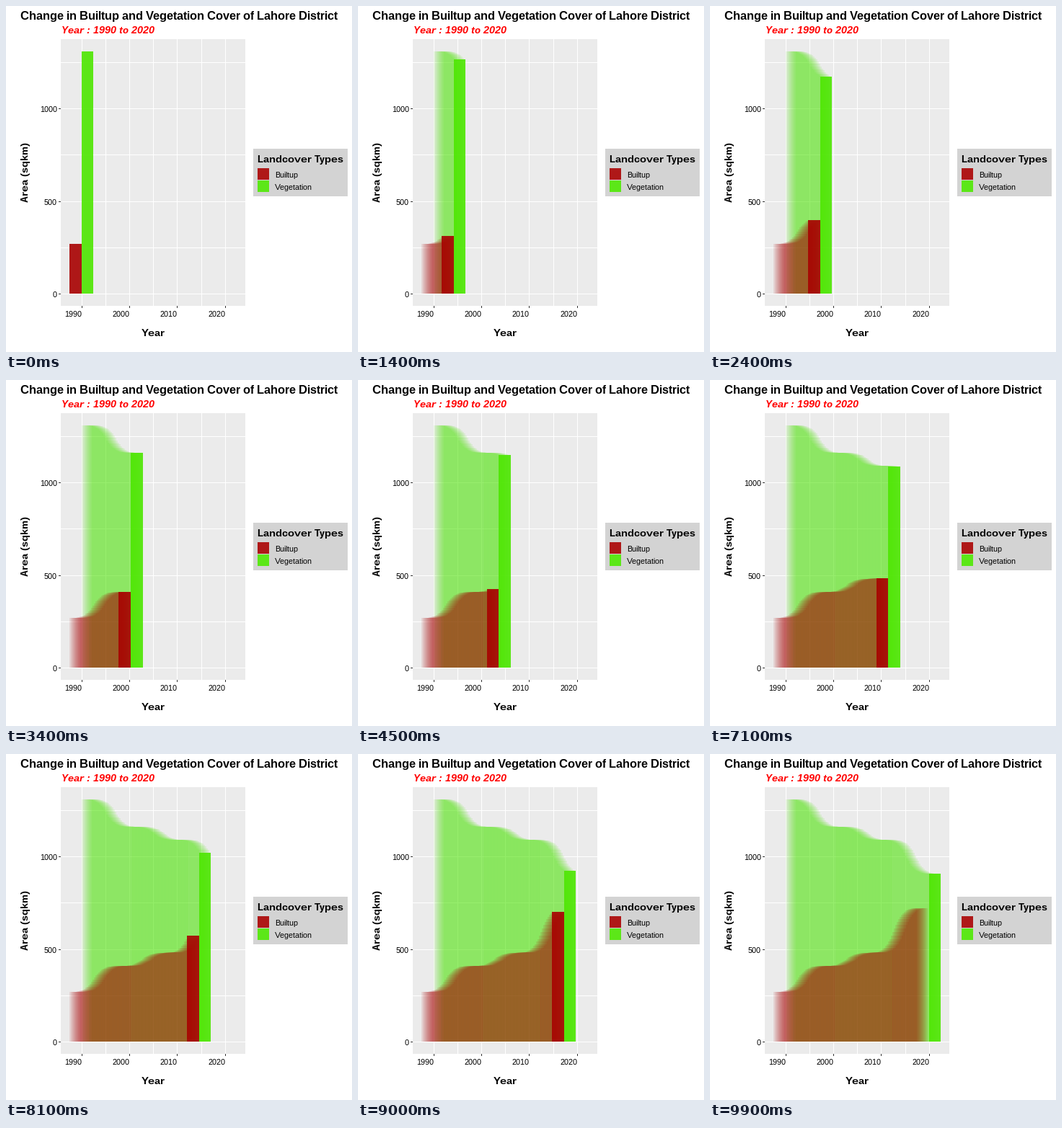
A matplotlib script that plays this animation: 480 px wide and 480 px high, repeating every 10 s.

```python
import matplotlib.pyplot as plt
from matplotlib.animation import FuncAnimation
from matplotlib.patches import Rectangle

plt.rcParams.update({
    "font.family": "Liberation Sans",
    "text.hinting": "native",
    "text.hinting_factor": 1,
})

SIZE, DPI = 480, 72
FRAMES, INTERVAL = 100, 100
RED, GREEN = "#A80000", "#4CE600"
BAR_ALPHA, TRAIL_ALPHA = 0.9, 0.098

# Panel geometry in pixels, y pointing down
LEFT, RIGHT, TOP, BOTTOM = 76, 332, 46, 416
X_1990, PX_PER_YEAR, BAR_W = 104.56, 6.642, 16.605
Y_ZERO, PX_PER_KM2 = 399.2, 0.2572

# Areas in sq km for 1990, 2000, 2010 and 2020
BUILTUP = (270, 409, 481, 721)
VEGETATION = (1308.5, 1159.5, 1088.5, 907)

fig = plt.figure(figsize=(SIZE / DPI, SIZE / DPI), dpi=DPI, facecolor="white")
ax = fig.add_axes((0, 0, 1, 1))
ax.set(xlim=(0, SIZE), ylim=(SIZE, 0))
ax.axis("off")


def px(v):
    return int(v + 0.5)


def year_x(year):
    return X_1990 + (year - 1990) * PX_PER_YEAR


def area_y(area):
    return Y_ZERO - area * PX_PER_KM2


def box(x0, y0, x1, y1, color, **kw):
    x0, y0, x1, y1 = map(px, (x0, y0, x1, y1))
    return ax.add_patch(Rectangle((x0, y0), x1 - x0, y1 - y0,
                                  facecolor=color, linewidth=0, **kw))


def label(x, y, text, size=11, **kw):
    return ax.text(x, y, text, fontsize=size, **kw)


def ease(p):
    """Cubic in-out."""
    return 4 * p ** 3 if p < 0.5 else 1 - 4 * (1 - p) ** 3


def area_at(values, years):
    i = min(int(years // 10), len(values) - 2)
    return values[i] + (values[i + 1] - values[i]) * ease(years / 10 - i)


def draw_panel():
    box(LEFT, TOP, RIGHT, BOTTOM, "#EBEBEB")
    for area in range(0, 1251, 250):
        y = px(area_y(area))
        box(LEFT, y, RIGHT, y + 1, "white")
        if area % 500 == 0:
            box(LEFT - 3, y, LEFT, y + 1, "#333333")
            label(71, y + 5, str(area), ha="right")
    for year in range(1990, 2021, 5):
        x = px(year_x(year))
        box(x, TOP, x + 1, BOTTOM, "white")
        if year % 10 == 0:
            box(x, BOTTOM, x + 1, BOTTOM + 3, "#333333")
            label(x, 431, str(year), ha="right")


def draw_text():
    label(20, 19, "Change in Builtup and Vegetation Cover of Lahore District",
          16, weight="bold")
    label(77, 38, "Year : 1990 to 2020", 14, weight="bold", style="italic",
          color="red")
    label(204, 458, "Year", 14, weight="bold", ha="center")
    label(28, 231, "Area (sqkm)", 14, weight="bold", rotation=90,
          ha="center", va="center")


def draw_legend():
    box(343, 198, 474, 264, "#D3D3D3")
    label(349, 217, "Landcover Types", 14, weight="bold")
    for y, color, name in ((225, RED, "Builtup"), (242, GREEN, "Vegetation")):
        box(349, y, 365, y + 16, "#F2F2F2")
        box(349, y, 365, y + 16, color, alpha=BAR_ALPHA)
        label(373, y + 13, name)


def make_bars(n):
    years = 30 * n / (FRAMES - 1)
    x = year_x(1990 + years)
    red = box(x - BAR_W, area_y(area_at(BUILTUP, years)), x, Y_ZERO, RED)
    green = box(x, area_y(area_at(VEGETATION, years)), x + BAR_W, Y_ZERO, GREEN)
    return red, green


draw_panel()
draw_text()
draw_legend()
bars = [make_bars(n) for n in range(FRAMES)]


def update(n):
    for i, pair in enumerate(bars):
        for bar in pair:
            bar.set_visible(i <= n)
            bar.set_alpha(BAR_ALPHA if i == n else TRAIL_ALPHA)
    # The closing year keeps only its vegetation bar
    bars[-1][0].set_visible(False)
    return [bar for pair in bars for bar in pair]


anim = FuncAnimation(fig, update, frames=FRAMES, interval=INTERVAL,
                     repeat=True, repeat_delay=0)
plt.show()
```
